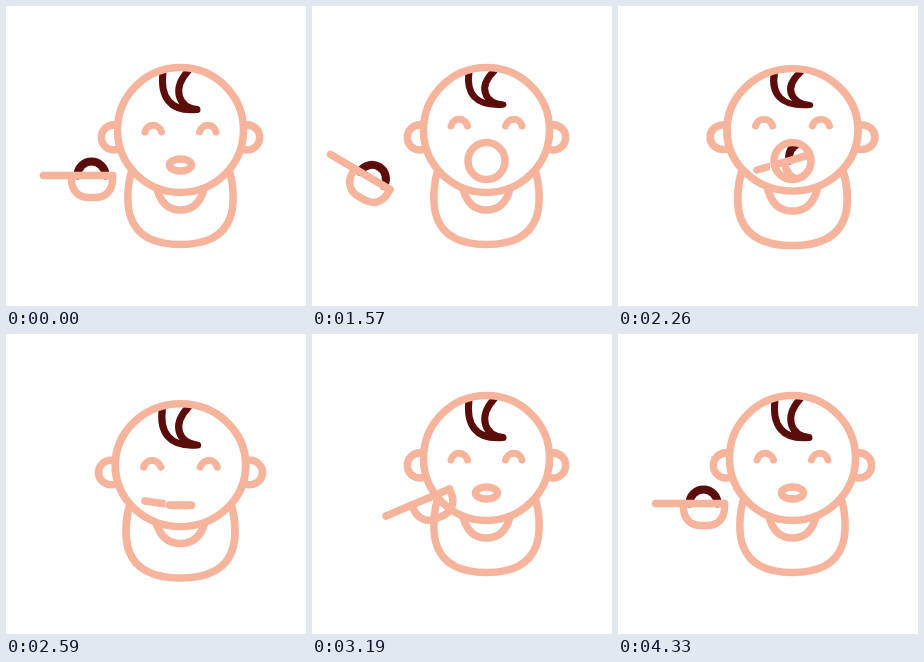
An HTML page with a canvas that plays this animation: 300x300 px, repeating every 4.66 s.

```html
<!DOCTYPE html>
<html lang="en">
<head>
<meta charset="utf-8">
<title>Baby and spoon</title>
<style>
  html, body { margin: 0; width: 100%; height: 100%; overflow: hidden; background: #fff; }
  canvas { display: block; width: 300px; height: 300px; }
</style>
</head>
<body>
<canvas id="stage" width="300" height="300"></canvas>
<script>
const ctx = document.getElementById('stage').getContext('2d');
const PEACH = '#f5b49b', DARK = '#5a0d0a';
const LOOP = 4660, STEP = 30, MOVE_START = 1030, MOVE_END = 4330;
const CX = 174.5, HEAD_Y = 124;

const ease = {
  sine: u => (1 - Math.cos(Math.PI * u)) / 2,
  in: u => u ** 3,
  out: u => 1 - (1 - u) ** 3
};

// 0 before the span, 1 after it
const ramp = (t, from, to, kind = 'sine') =>
  ease[kind](Math.min(1, Math.max(0, (t - from) / (to - from))));

// Smooth hump of height 1 around a peak
const bump = (t, peak, reach) =>
  Math.abs(t - peak) < reach ? Math.cos(Math.PI / 2 * (t - peak) / reach) ** 2 : 0;

// The spoon's way: start and end of each move, then handle x, y, angle
const rest = [37.5, 169.5, 0];
const moves = [
  { from: 970, to: 1560, pose: [18.5, 148.5, 30.5] },
  { from: 1560, to: 2260, pose: [139, 164, -16] },
  { from: 2260, to: 2590, pose: [139, 167, 8] },
  { from: 2590, to: 3190, pose: [74, 182, -23], kind: 'in' },
  { from: 3190, to: 3710, pose: [30.5, 169, 0], kind: 'out' },
  { from: 3710, to: 4270, pose: rest }
];

const spoonAt = t => moves.reduce((at, { from, to, pose, kind }) => {
  const u = ramp(t, from, to, kind);
  return at.map((v, i) => v + (pose[i] - v) * u);
}, rest);

function babyAt(t) {
  const crouch = bump(t, 1290, 280), gulp = bump(t, 2480, 290);
  const open = ramp(t, 970, 1540) - ramp(t, 2290, 2560);
  const shut = ramp(t, 2290, 2560) - ramp(t, 2740, 3190);
  const headY = 2 * crouch - 7 * bump(t, 2080, 260) + 10.5 * gulp - 2 * bump(t, 2930, 250);
  return {
    open, headY,
    wide: 1 + 0.024 * crouch + 0.09 * bump(t, 2420, 300),
    bodyY: 2.5 * crouch + 8 * gulp + bump(t, 3450, 250),
    mouth: {
      rx: 11 + 7.5 * open,
      ry: 6 + 12.5 * open - 5.7 * shut,
      y: 159 - 4 * open + 5 * shut + headY
    }
  };
}

const shape = {
  body: new Path2D('M127 161C120 180 121 202 125 212C133 234 156 238.5 174.5 238.5S216 234 224 212C228 202 229 180 222 161'),
  collar: new Path2D('M151 183C155 198 164 204 174.5 204S194 198 198 183'),
  ear: new Path2D('M112 119A12.5 12.5 0 1 0 115 143'),
  eye: new Path2D('M139 126C141 117 153 117 155.5 126'),
  curl: new Path2D('M157 66C154 90 163 106 191 103.5C172 101 166 83 182 65'),
  handle: new Path2D('M0 0H69'),
  bowl: new Path2D('M28 0V4C28 15 35 22 45 22H52C62 22 69 15 69 4V0')
};

function stroke(path, color = PEACH, width = 7.5) {
  ctx.strokeStyle = color;
  ctx.lineWidth = width;
  ctx.stroke(path);
}

function oval(x, y, rx, ry) {
  const p = new Path2D();
  p.ellipse(x, y, rx, ry, 0, 0, 2 * Math.PI);
  return p;
}

// Shift by (dx, dy) and stretch about a fixed point
function group({ x = CX, y = 0, sx = 1, sy = 1, dx = 0, dy = 0 }, paint) {
  ctx.save();
  ctx.translate(x + dx, y + dy);
  ctx.scale(sx, sy);
  ctx.translate(-x, -y);
  paint();
  ctx.restore();
}

// The same part on both sides of the face
function pair(path, place, width) {
  for (const side of [1, -1]) {
    group({ sx: side }, () => group(place, () => stroke(path, PEACH, width)));
  }
}

function drawHead(open) {
  const head = oval(CX, HEAD_Y, 63, 62.5);
  pair(shape.ear, { dx: -2.5 });
  ctx.fillStyle = '#fff';
  ctx.fill(head);
  group({ y: 66, sy: 1 - 0.13 * open }, () => stroke(shape.curl, DARK, 7));
  stroke(head);
  pair(shape.eye, { dy: -6 * open }, 7);
}

function drawSpoon([x, y, deg], food, mouth) {
  ctx.save();
  // The part past the lips shows only inside the mouth
  const seen = new Path2D();
  seen.rect(0, 0, CX - mouth.rx - 4, 300);
  seen.addPath(oval(CX, mouth.y, mouth.rx, mouth.ry));
  ctx.clip(seen);
  ctx.translate(x, y);
  ctx.rotate(deg * Math.PI / 180);
  if (food > 0.02) {
    const lump = new Path2D();
    lump.arc(48, 0, 14 * food, Math.PI, 2 * Math.PI);
    stroke(lump, DARK, 8 * food);
  }
  stroke(shape.bowl);
  stroke(shape.handle);
  ctx.restore();
}

function draw(time) {
  const moving = time >= MOVE_START && time < MOVE_END;
  const t = moving ? MOVE_START + Math.floor((time - MOVE_START) / STEP) * STEP : 0;
  const { open, headY, bodyY, wide, mouth } = babyAt(t);
  const food = t < 2530 ? 1 : ramp(t, 3750, 4270);

  ctx.fillStyle = '#fff';
  ctx.fillRect(0, 0, 300, 300);
  ctx.lineCap = ctx.lineJoin = 'round';
  group({ sx: wide, dy: bodyY }, () => {
    stroke(shape.body);
    stroke(shape.collar);
  });
  group({ y: HEAD_Y, sx: wide, sy: 1 - (wide - 1) / 2, dy: headY }, () => drawHead(open));
  drawSpoon(spoonAt(t), food, mouth);
  stroke(oval(CX, mouth.y, mouth.rx, mouth.ry));
}

const start = performance.now();
function tick() {
  draw((performance.now() - start) % LOOP);
  requestAnimationFrame(tick);
}
tick();
</script>
</body>
</html>
```
